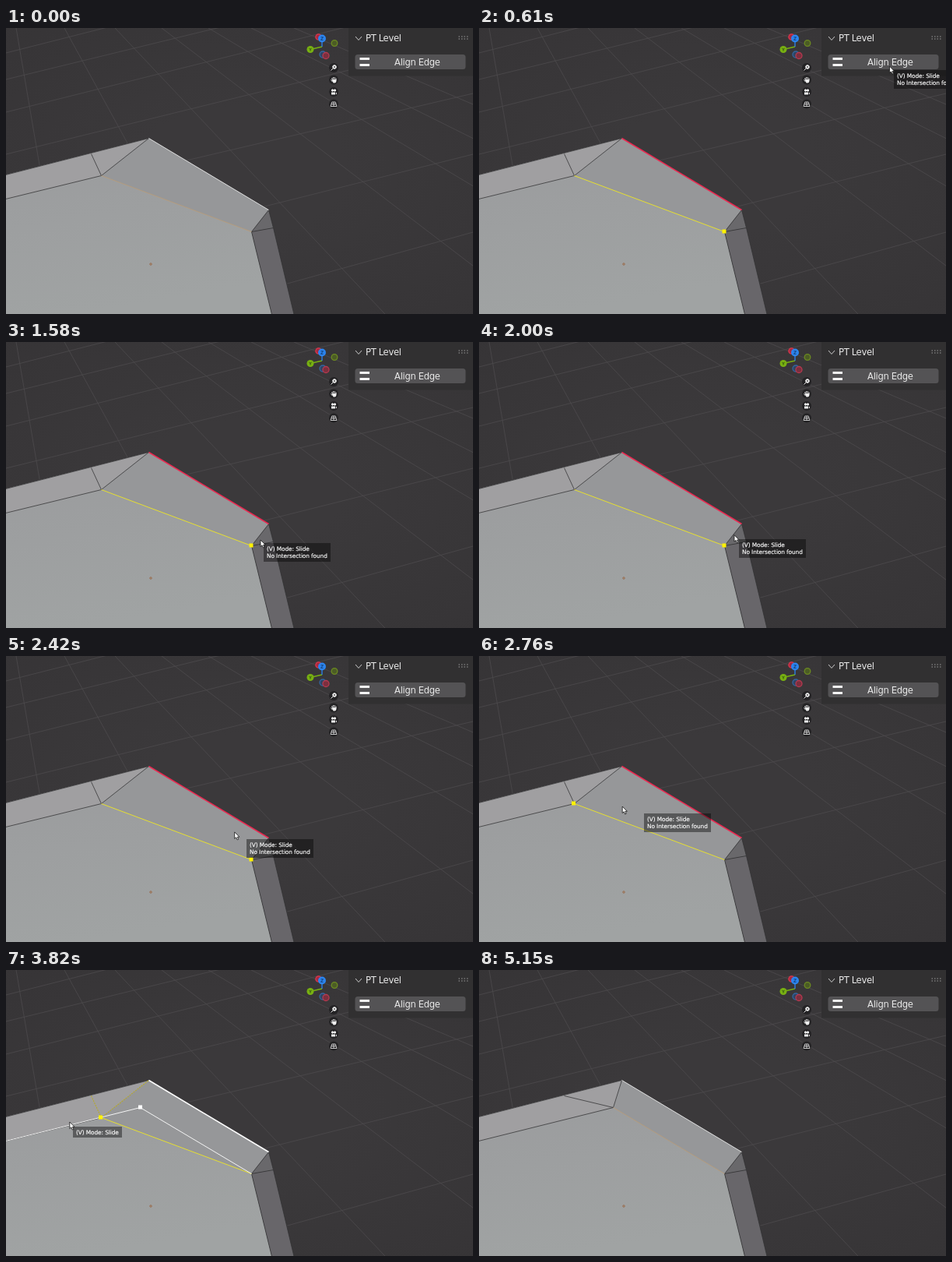
These frames come from a looping animation (600 by 367 pixels, 5.67 s). An HTML page:

```html
<!DOCTYPE html>
<html lang="en">
<head>
<meta charset="utf-8">
<title>Align edge</title>
<style>
  html, body { margin: 0; width: 100%; height: 100%; overflow: hidden; background: #3a383a; }
  svg { display: block; width: 600px; height: 367px; }
  text { font-family: "DejaVu Sans", sans-serif; font-size: 11.6px; letter-spacing: -.35px; fill: #e8e8e8; }
  .line { fill: none; stroke: #303032; stroke-width: .75; }
  .grid { fill: none; stroke: #4d4b4d; stroke-width: .8; }
  .dots { stroke: #b5a829; stroke-width: 1.1; stroke-dasharray: 2 1.2; }
  .white { stroke: #f4f4f4; stroke-width: 1; }
  #tip text { font-size: 7.4px; letter-spacing: -.1px; fill: #fff; stroke: #fff; stroke-width: .15; }
</style>
</head>
<body>
<svg viewBox="0 0 600 367">
  <defs>
    <linearGradient id="face" x1="0" y1="0" x2=".25" y2="1">
      <stop offset="0" stop-color="#9a9b9d"/>
      <stop offset="1" stop-color="#a0a3a3"/>
    </linearGradient>
    <radialGradient id="floor" r=".75">
      <stop offset=".3" stop-color="#3b393b"/>
      <stop offset="1" stop-color="#363436"/>
    </radialGradient>
  </defs>
  <rect width="600" height="367" fill="url(#floor)"/>
  <path id="grid" class="grid"/>

  <g transform="translate(.5 .5)">
    <path fill="url(#face)" d="M-1 188 183 141 337 233 315 261 341 367H-1z"/>
    <path id="leftBevel" fill="#a09fa1"/>
    <path id="rightBevel" fill="#969799"/>
    <path fill="#69686b" d="M337 233 343 256 315 261z"/>
    <path fill="#68666a" d="M315 261 343 256 369.500 367H341z"/>
    <path class="line" d="M-1 188 183 141M337 233 343 256 369.500 367M337 233 315 261 341 367M315 261 343 256"/>
    <path id="wires" class="line"/>
    <path id="inner" class="line"/>
    <path id="outer" class="line" d="M183 141 337 233"/>
    <g id="preview">
      <path class="line dots" d="M109 161 122 189 183 141"/>
      <path class="line white" d="M-1 219 172 176 315 261"/>
      <path fill="#fff" d="M169.500 173h5v5h-5z"/>
    </g>
  </g>
  <rect id="marker" width="5" height="5" fill="#fff200"/>
  <circle cx="186" cy="303" r="1.300" fill="#a39584" stroke="#94603f" stroke-width=".7"/>

  <!-- view gizmo -->
  <g stroke-width="1.3">
    <circle cx="401.5" cy="11.5" r="3.6" fill="#a52b40" stroke="#e0354d"/>
    <circle cx="407" cy="34" r="4" fill="#2e4563" stroke="#3466a0"/>
    <circle cx="411" cy="35.500" r="4" fill="#7b2f3e" stroke="#b53a50"/>
    <circle cx="422" cy="19.500" r="3.800" fill="#4c5c25" stroke="#6b8a22"/>
    <path d="M406 24 391 27.500" stroke="#78b012"/>
    <path d="M406 24V13" stroke="#2c84ee"/>
    <circle cx="391" cy="27.500" r="4.500" fill="#78b012"/>
    <circle cx="406" cy="13.500" r="5" fill="#2c84ee"/>
  </g>
  <g fill="none" stroke="#1d3a10" stroke-width=".8">
    <path d="M389.500 25.800 391 27.600 392.500 25.800M391 27.600V29.500"/>
    <path stroke="#0f2d58" d="M404.500 11.800H407.500L404.500 15.300H407.500"/>
  </g>

  <!-- view buttons -->
  <g fill="#232224">
    <circle cx="421" cy="51" r="6"/><circle cx="421" cy="66.500" r="6"/>
    <circle cx="421" cy="82" r="6"/><circle cx="421" cy="97.500" r="6"/>
  </g>
  <g fill="#eee" stroke="#eee" stroke-width="1">
    <circle cx="422" cy="50" r="2.300"/>
    <path d="M420 52 417.500 54.500"/>
    <path d="M419 66V64M420.700 65.500V63M422.300 65.500V63.300M424 66.500V64.500M417.500 66.500 419.500 69"/>
    <path stroke="none" d="M418.500 66H424.500V68Q424 70.500 422.500 70.500H420.500z"/>
    <circle cx="419.500" cy="80" r="1.200"/><circle cx="422.500" cy="80" r="1.200"/>
    <path stroke="none" d="M418 82.500h5v3h-5zM423.500 84 425 82.500V85.500z"/>
    <path fill="none" stroke-width=".8" d="M418.800 95H423.200L425 100.500H417zM418 97.700H424M421 95V100.500"/>
    <path stroke="#232224" stroke-width=".7" d="M421 50H423M422 49V51"/>
  </g>

  <!-- side panel -->
  <path fill="#313031" d="M440 0H600V61.500H440z"/>
  <path fill="none" stroke="#ccc" d="M449 11 453 15.500 457 11"/>
  <text x="462" y="17">PT Level</text>
  <path stroke="#9a9a9a" stroke-width="1.200" stroke-dasharray="1.500 2" d="M581.500 11H594M581.500 14H594"/>
  <rect x="448.500" y="34" width="142" height="19" rx="3.500" fill="#545355"/>
  <path fill="#f4f4f4" d="M454.500 38H467V41H454.500zM454.500 46H467V49H454.500z"/>
  <text x="528.300" y="47.500" text-anchor="middle">Align Edge</text>

  <g id="tip">
    <rect id="tipBox" fill-opacity=".42"/>
    <text x="4" y="10">(V) Mode: Slide</text>
    <text id="warning" x="4" y="19">No Intersection found</text>
  </g>
  <path id="cursor" fill="#fff" stroke="#111" stroke-width=".8" d="M0 0V8.500L2 6.800 3.500 10 5 9.300 3.600 6.300H6.200z"/>
</svg>
<script>
const LOOP = 5670, START = 560, ALIGN = 3350, CONFIRM = 4500, TIP_LAG = 70;
const $ = id => document.getElementById(id);
const set = (id, attrs) => {
  for (const name in attrs) $(id).setAttribute(name, attrs[name]);
};
const show = (id, on) => set(id, { visibility: on ? 'visible' : 'hidden' });

// floor grid: one family through a vanishing point, one by its heights at both sides
let grid = '';
for (const x of [13, 75, 140, 200, 260, 315, 370]) {
  grid += `M${x} 0L${x + (x + 15) / 164 * 367} 367`;
}
for (const [left, right] of [[32, -120], [66, -80], [108, -42], [162, 15], [224, 84], [312, 162], [428, 262]]) {
  grid += `M0 ${left}L600 ${right}`;
}
set('grid', { d: grid });

// time, x, y
const path = [
  [60, 585, 115], [350, 535, 52], [800, 522, 47], [900, 469, 88], [970, 408, 134],
  [1110, 333, 246], [1300, 324, 257], [1500, 327, 254], [1600, 327, 254],
  [1900, 331, 250], [2200, 322, 243], [2350, 305, 231], [2420, 294, 226],
  [2700, 205, 197], [2990, 106, 178], [3060, 104, 178], [3400, 90, 190],
  [3750, 82, 197], [3820, 82, 195], [4150, 24, 209], [CONFIRM, 24, 209]
];
function pointer(t) {
  const i = path.findIndex(key => key[0] > t);
  if (i < 1) return path[i ? path.length - 1 : 0].slice(1);
  const [t0, x0, y0] = path[i - 1], [t1, x1, y1] = path[i];
  const k = (t - t0) / (t1 - t0);
  return [x0 + (x1 - x0) * k, y0 + (y1 - y0) * k];
}

function draw(t) {
  const done = t >= CONFIRM;
  const active = t >= START && !done;
  const aligned = active && t >= ALIGN;
  const [x, y] = pointer(t);
  const [tipX, tipY] = pointer(t - TIP_LAG);
  const corner = done ? '172 176' : '122 189';

  set('leftBevel', { d: `M-1 188 183 141 ${corner} -1 219z` });
  set('rightBevel', { d: `M183 141 337 233 315 261 ${corner}z` });
  set('wires', { d: `M-1 219 ${corner}` + (aligned ? '' : `M109 161 ${corner} 183 141`) });
  set('inner', {
    d: `M${corner} 315 261`,
    style: active ? 'stroke:#e6df30;stroke-width:1' : 'stroke:#bd9c74'
  });
  set('outer', {
    style: !active ? 'stroke:#dcdcdc;stroke-width:1'
      : aligned ? 'stroke:#fff;stroke-width:1.5' : 'stroke:#ea2850;stroke-width:1.5'
  });
  show('preview', aligned);

  const nearLeft = x < 218;
  set('marker', { x: nearLeft ? 119 : 312.5, y: nearLeft ? 186.5 : 258.5 });
  show('marker', active);

  set('tip', { transform: `translate(${Math.round(tipX) + 4} ${Math.round(tipY) + 4})` });
  set('tipBox', { width: aligned ? 63 : 86, height: aligned ? 14 : 24 });
  show('tip', active);
  show('warning', active && !aligned);

  set('cursor', { transform: `translate(${x} ${y})` });
  show('cursor', t >= 60 && !done);
}

function frame() {
  draw(performance.now() % LOOP);
  requestAnimationFrame(frame);
}
frame();
</script>
</body>
</html>
```
